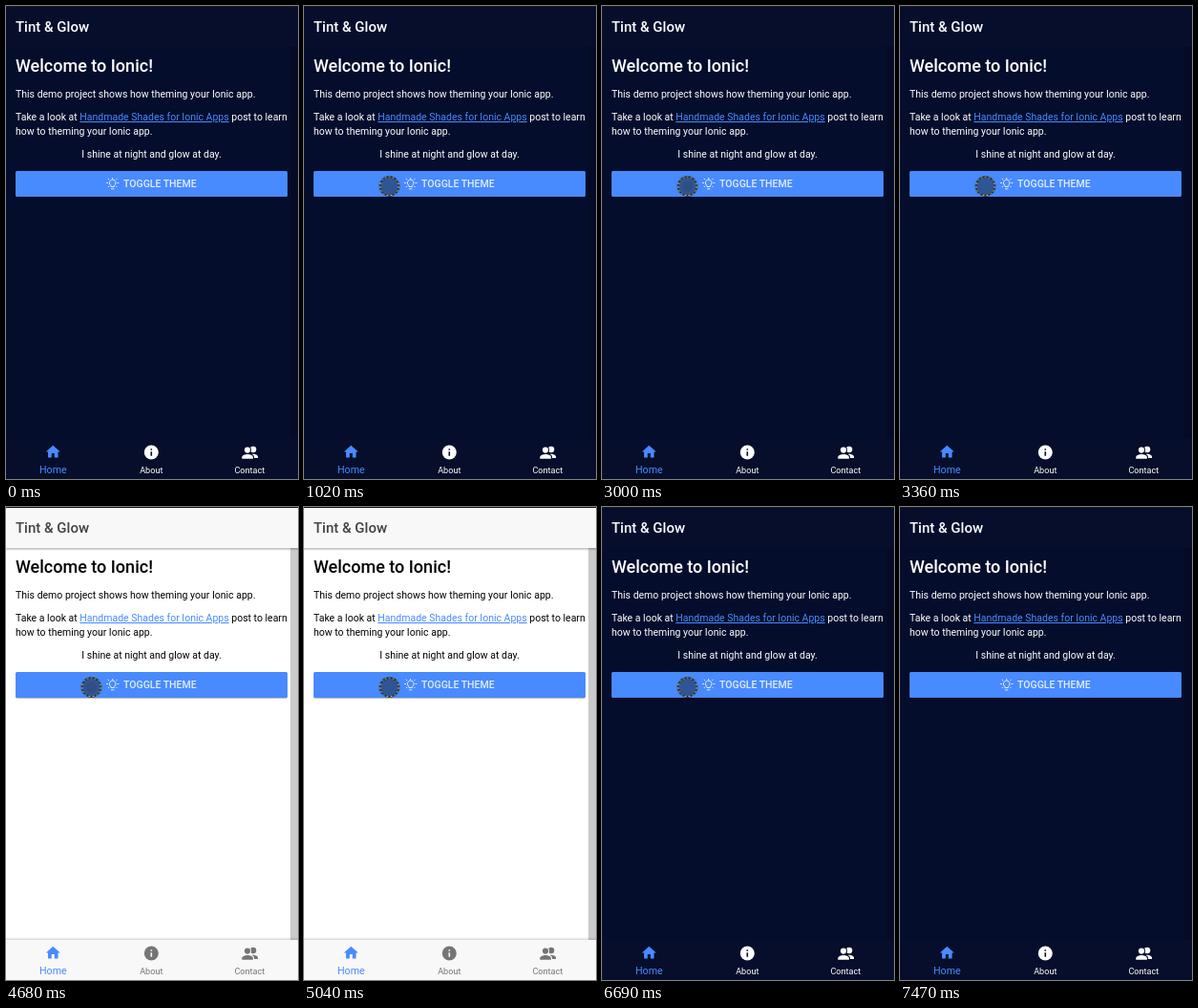
An HTML page that plays this animation: 306 px wide and 496 px high, repeating every 7.5 s.

```html
<!DOCTYPE html>
<html lang="en">
<head>
<meta charset="utf-8">
<title>Theme toggle</title>
<style>
  html, body { margin: 0; width: 100%; height: 100%; overflow: hidden; }
  svg { display: block; width: 306px; height: 496px; font-family: Roboto, sans-serif; animation: theme 7.5s step-end infinite; }
  text { font-size: 10.5px; fill: var(--text); }
  .title { font-size: 15px; font-weight: 500; fill: var(--title); }
  .heading { font-size: 18px; font-weight: 500; }
  .link { fill: #488aff; text-decoration: underline; }
  .label { font-weight: 500; fill: #e4edff; }
  .tab { fill: var(--tab); }
  .tab text { font-size: 9.1px; fill: inherit; text-anchor: middle; }
  .tab.on { fill: #488aff; }
  .tab.on text { font-size: 10.7px; }
  .page { fill: var(--page); }
  .bar { fill: var(--bar); }
  .scroll { fill: var(--scroll); }
  .shade { opacity: var(--shade); }

  /* The palette flips at once on each tap. */
  @keyframes theme {
    0%, 40%, 84.4%, 100% {
      --page: #040d2b; --bar: #060e2b; --scroll: #050b25; --text: #fff;
      --title: #fff; --tab: #fff; --shade: .25;
    }
    20.8%, 62.4% {
      --page: #fff; --bar: #f8f8f8; --scroll: #cbcbcb; --text: #000;
      --title: #424242; --tab: #757575; --shade: 1;
    }
  }

  .cursor { visibility: hidden; animation: show 7.5s step-end infinite, move 7.5s infinite; }
  @keyframes show {
    0%, 99.2%, 100% { visibility: hidden; }
    4.4% { visibility: visible; }
  }
  @keyframes move {
    0%, 4.4% { transform: translate(121px, 4px); animation-timing-function: cubic-bezier(.3, .1, .4, 1); }
    13.6%, 100% { transform: translate(89.5px, 189px); }
  }

  .ripple { fill: #555; opacity: 0; transform: translate(89.5px, 189px) scale(0); animation: ripple 7.5s var(--at) infinite; }
  @keyframes ripple {
    0% { opacity: .2; transform: translate(89.5px, 189px) scale(.02); animation-timing-function: ease-out; }
    2.4% { opacity: .17; transform: translate(89.5px, 189px) scale(.75); }
    4.6%, 100% { opacity: 0; transform: translate(89.5px, 189px) scale(1); }
  }
</style>
</head>
<body>
<svg viewBox="0 0 306 496">
  <defs>
    <linearGradient id="down" x2="0" y2="1">
      <stop stop-opacity=".28"/><stop offset="1" stop-opacity="0"/>
    </linearGradient>
    <linearGradient id="up" y1="1" x2="0" y2="0">
      <stop stop-opacity=".16"/><stop offset="1" stop-opacity="0"/>
    </linearGradient>
    <clipPath id="face"><rect x="10" y="173" width="285" height="27" rx="1.5"/></clipPath>
  </defs>

  <rect class="page" width="306" height="496"/>
  <rect class="scroll" x="298" y="43" width="8" height="411"/>
  <rect class="bar" width="306" height="43"/>
  <rect class="shade" y="43" width="306" height="3" fill="url(#down)"/>
  <rect width="306" height="1" fill="#151515"/>
  <text class="title" x="10" y="27">Tint &amp; Glow</text>

  <text class="heading" x="10" y="69">Welcome to Ionic!</text>
  <text x="10" y="96">This demo project shows how theming your Ionic app.</text>
  <text x="10" y="120">Take a look at <tspan class="link">Handmade Shades for Ionic Apps</tspan> post to learn</text>
  <text x="10" y="135">how to theming your Ionic app.</text>
  <text x="152.5" y="159" text-anchor="middle">I shine at night and glow at day.</text>

  <rect class="shade" x="10" y="174" width="285" height="27" rx="2" fill="#000" fill-opacity=".25"/>
  <rect x="10" y="173" width="285" height="27" rx="1.5" fill="#488aff"/>
  <g clip-path="url(#face)">
    <circle class="ripple" r="220" style="--at:1.56s"/>
    <circle class="ripple" r="220" style="--at:3s"/>
    <circle class="ripple" r="220" style="--at:4.68s"/>
    <circle class="ripple" r="220" style="--at:6.33s"/>
  </g>
  <g fill="none" stroke="#e4edff">
    <path d="M110 189.5v-1.2a3.3 3.3 0 1 1 3.4 0v1.2zM110 191.8h3.4"/>
    <path d="M111.7 180v1.8M105 185.5h1.9M116.5 185.5h1.9M106.8 180.8l1.3 1.3M116.6 180.8l-1.3 1.3M106.9 190l1.2-1.2M116.5 190l-1.2-1.2"/>
  </g>
  <text class="label" x="123" y="190">TOGGLE THEME</text>

  <rect class="shade" y="451" width="306" height="3" fill="url(#up)"/>
  <rect class="bar" y="454" width="306" height="42"/>
  <g class="tab on">
    <path transform="translate(40.3 458.5) scale(.75)" d="M10 20v-6h4v6h5v-8h3L12 3 2 12h3v8z"/>
    <text x="49.3" y="490">Home</text>
  </g>
  <g class="tab">
    <circle cx="152.3" cy="468" r="7.5"/>
    <path class="bar" d="M151.5 464.2h1.6v1.6h-1.6zM151.5 467.2h1.6v4.6h-1.6z"/>
    <text x="152.3" y="490">About</text>
  </g>
  <g class="tab">
    <circle cx="259" cy="465" r="3.3"/>
    <path d="M254 474v-1.2c0-2 3-3 5-3s5 1 5 3v1.2z"/>
    <g class="bar">
      <circle cx="253" cy="465.6" r="4"/>
      <path d="M246 475.5v-2.5c0-3 4-4 7-4s7 1 7 4v2.5z"/>
    </g>
    <circle cx="253" cy="465.6" r="3.1"/>
    <path d="M247.3 474.7v-1.5c0-2.4 3.6-3.3 5.8-3.3s5.8.9 5.8 3.3v1.5z"/>
    <text x="255.3" y="490">Contact</text>
  </g>

  <g class="cursor">
    <circle r="10" fill="#141414" fill-opacity=".45" stroke="#171b22" stroke-width="1.3"/>
    <circle r="9.8" fill="none" stroke="#d9dc55" stroke-dasharray="1.9 2.2"/>
  </g>
</svg>
</body>
</html>
```
